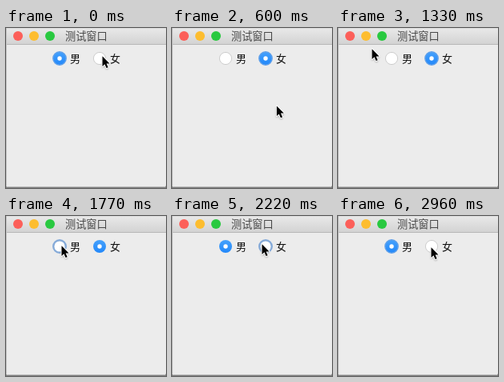
An HTML page for the animation above (3060 ms loop, 200 by 200 pixels).

```html
<!DOCTYPE html>
<html lang="zh">
<head>
<meta charset="utf-8">
<style>
  html, body { margin: 0; width: 100%; height: 100%; overflow: hidden; background: #ececec; }
  svg { display: block; width: 100vw; height: 100vh; }
  text { font: 13px "Noto Sans CJK SC", "Noto Sans CJK", "Noto Sans CJK JP", sans-serif; }
</style>
</head>
<body>
<svg viewBox="0 0 200 200">
  <defs>
    <linearGradient id="bar" x2="0" y2="1">
      <stop stop-color="#e9e9e9"/><stop offset="1" stop-color="#d3d3d3"/>
    </linearGradient>
    <linearGradient id="blue" x2="0" y2="1">
      <stop stop-color="#45a1fc"/><stop offset="1" stop-color="#2288fa"/>
    </linearGradient>
    <filter id="soft" x="-50%" y="-50%" width="200%" height="200%">
      <feGaussianBlur stdDeviation=".9"/>
    </filter>
    <path id="arrow" d="M1.5 1.3V13.9L4.4 11.2L6.5 16.1L8.7 15.2L6.6 10.4H10.5Z"/>
  </defs>

  <rect width="200" height="200" fill="#808080"/>
  <path d="M0 0H200V196Q200 199 197 199H3Q0 199 0 196Z" fill="#ececec"/>
  <rect width="200" height="20" fill="url(#bar)"/>
  <rect width="200" height="1" fill="#dcdcdc"/>
  <rect y="20" width="200" height="1" fill="#b8b8b8"/>
  <rect width="1" height="197" fill="#c2c2c2"/>
  <rect x="2" y="198" width="196" height="1" fill="#bcbcbc"/>

  <circle cx="15" cy="10" r="6" fill="#fc5f59"/>
  <circle cx="35" cy="10" r="6" fill="#fdbd2f"/>
  <circle cx="55" cy="10" r="6" fill="#29c940"/>
  <text x="74" y="15" fill="#484848" style="font-size:13.2px">测试窗口</text>

  <g id="radios"></g>
  <text x="80" y="42.5" fill="#111">男</text>
  <text x="130" y="42.5" fill="#111">女</text>

  <g id="cursor">
    <use href="#arrow" y="1.3" fill="#000" stroke="#000" opacity=".35" filter="url(#soft)"/>
    <use href="#arrow" fill="#000" stroke="#fff" stroke-width="2" stroke-linejoin="round" paint-order="stroke"/>
  </g>
</svg>
<script>
const LOOP = 3060;
const TICK = 147.4; // the screen refreshes in these steps
const START = [119, 34];

// pointer moves, in ticks
const moves = [
  { from: 2, to: 5, end: [133, 118] },
  { from: 6, to: 8, end: [41, 25] },
  { from: 9, to: 10, end: [73, 43] },
  { from: 10, to: 11, end: [68, 36] },
  { from: 12, to: 13, end: [111, 34] },
  { from: 16, to: 17, end: [77, 37] },
  { from: 18, to: 20, end: [115, 38] }
];
// each press picks the other radio
const presses = [1, 12, 15, 18];

const ease = u => u * u * (3 - 2 * u);
const clamp = u => Math.min(1, Math.max(0, u));

function pointer(tick) {
  return moves.reduce((pos, { from, to, end }) => {
    const k = ease(clamp((tick - from) / (to - from)));
    return pos.map((p, i) => p + (end[i] - p) * k);
  }, START);
}

const picked = tick => presses.filter(p => p <= tick).length % 2;

function radio(x, on, focused) {
  const circle = (r, attrs) => `<circle cx="${x}" cy="38" r="${r}" ${attrs}/>`;
  const face = on
    ? circle(8, 'fill="url(#blue)"') + circle(2.7, 'fill="#fff"')
    : circle(7.6, 'fill="#fff" stroke="#c3c3c3" stroke-width=".8"');
  const ring = !focused ? ''
    : on ? circle(8.2, 'fill="none" stroke="#5c9eea" stroke-width="1.4"')
    : circle(7.8, 'fill="none" stroke="#86abd9" stroke-width="2.4"');
  return face + ring;
}

const radios = document.getElementById('radios');
const cursor = document.getElementById('cursor');
let shown = -1;

function draw(now) {
  const tick = Math.floor(now % LOOP / TICK);
  if (tick === shown) return;
  shown = tick;
  // focus moves on press, the choice on release one tick later
  const focus = picked(tick), choice = picked(tick - 1);
  radios.innerHTML = [67, 117].map((x, i) => radio(x, choice === i, focus === i)).join('');
  cursor.setAttribute('transform', `translate(${pointer(tick)})`);
}

let origin;
function run(now) {
  origin ??= now;
  draw(now - origin);
  requestAnimationFrame(run);
}
draw(0);
requestAnimationFrame(run);
</script>
</body>
</html>
```
